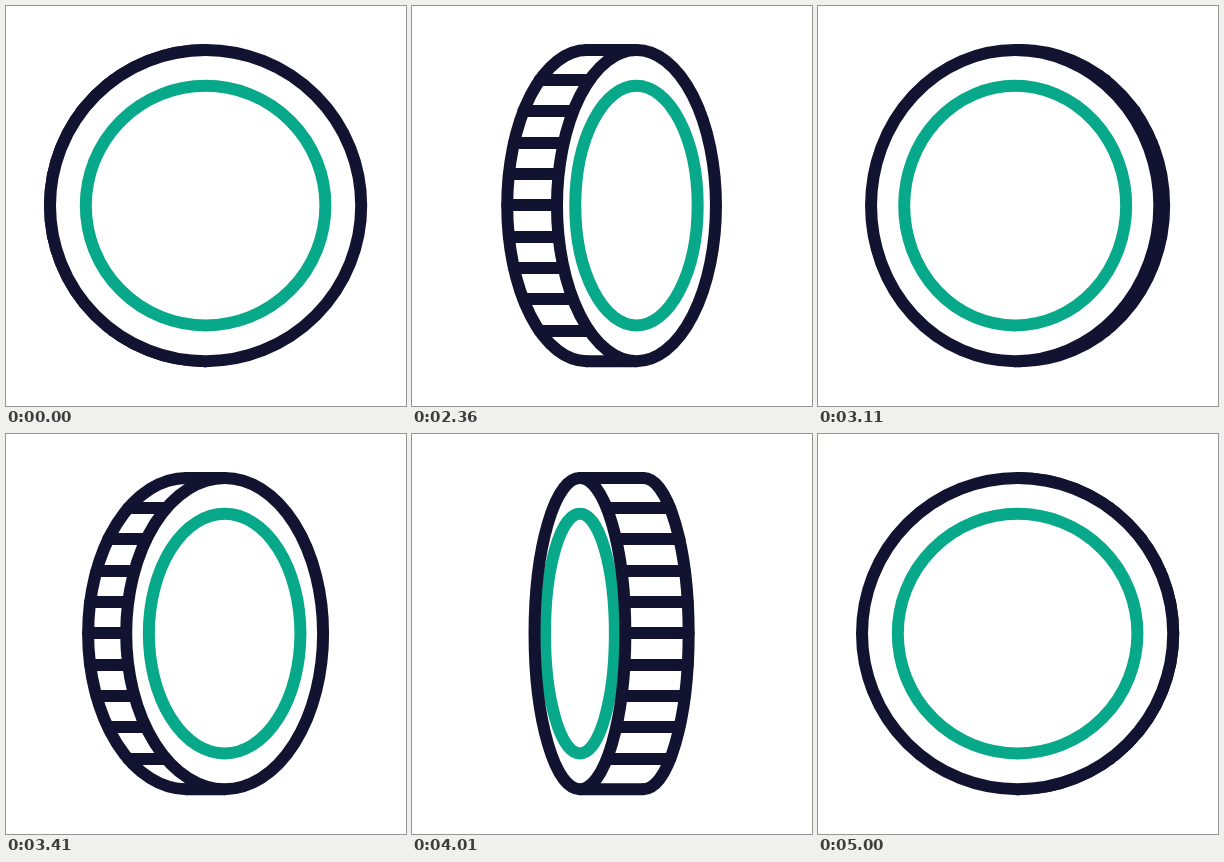
Write an HTML page with a canvas that moves like this. It is 400 px wide and 400 px high and loops after 5030 ms.

```html
<!DOCTYPE html>
<html>
<head>
<meta charset="utf-8">
<title>Spinning coin</title>
<style>
  html, body { margin: 0; height: 100%; overflow: hidden; background: #fff; }
  canvas { display: block; }
</style>
</head>
<body>
<canvas id="stage" width="400" height="400"></canvas>
<script>
const ctx = document.getElementById('stage').getContext('2d');
const LOOP = 5030, STEP = 30, START = 2000;
const CENTER = 199.6, RIM = 155.6, RING = 119.8, DEPTH = 34;
const RUNGS = 5, GAP = 31.3;
const DARK = '#121331', GREEN = '#08a88a';

// Quarter turns: end time, easing power, closing (face to edge) or opening
const TURNS = [
  { end: 2600, power: 1.4, closing: true },
  { end: 3165, power: 1.12, closing: false },
  { end: 3832, power: 1, closing: true },
  { end: 4930, power: 1.95, closing: false }
];

// Width of the face (0 to 1) and the side it is shifted to
function pose(t) {
  let from = START;
  if (t <= from) return { width: 1, side: 1 };
  for (const { end, power, closing } of TURNS) {
    if (t < end) {
      const p = (t - from) / (end - from);
      return closing
        ? { width: 1 - p ** power, side: 1 }
        : { width: 1 - (1 - p) ** power, side: -1 };
    }
    from = end;
  }
  return { width: 1, side: -1 };
}

function ellipse(x, rx, ry, color, from = 0, to = 2 * Math.PI) {
  ctx.beginPath();
  ctx.ellipse(x, CENTER, rx, ry, 0, from, to);
  ctx.strokeStyle = color;
  ctx.stroke();
}

function draw(t) {
  const { width, side } = pose(t);
  const shift = side * DEPTH * (1 - width ** 2.5) ** 1.514;
  const front = CENTER + shift, back = CENTER - shift;
  const rx = RIM * width;

  ctx.clearRect(0, 0, 400, 400);
  ctx.lineWidth = 12;
  ctx.lineCap = 'round';

  const quarter = Math.PI / 2;
  ellipse(back, rx, RIM, DARK, side * quarter, side * quarter + Math.PI);

  // Rungs sit on whole pixels; the outermost two close the rim
  ctx.beginPath();
  for (let i = -RUNGS; i <= RUNGS; i++) {
    const h = Math.max(-1, Math.min(1, i * GAP / RIM));
    const edge = side * rx * Math.sqrt(1 - h * h);
    const y = Math.abs(h) < 1 ? Math.round(CENTER - 0.3 + i * GAP) : CENTER + h * RIM;
    ctx.moveTo(front - edge, y);
    ctx.lineTo(back - edge, y);
  }
  ctx.stroke();

  ctx.beginPath();
  ctx.ellipse(front, CENTER, rx, RIM, 0, 0, 2 * Math.PI);
  ctx.fillStyle = '#fff';
  ctx.fill();
  ellipse(front, RING * width, RING, GREEN);
  ellipse(front, rx, RIM, DARK);
}

const begin = performance.now();
function tick() {
  const t = (performance.now() - begin) % LOOP;
  draw(START + Math.floor((t - START) / STEP) * STEP);
  requestAnimationFrame(tick);
}
tick();
</script>
</body>
</html>
```
